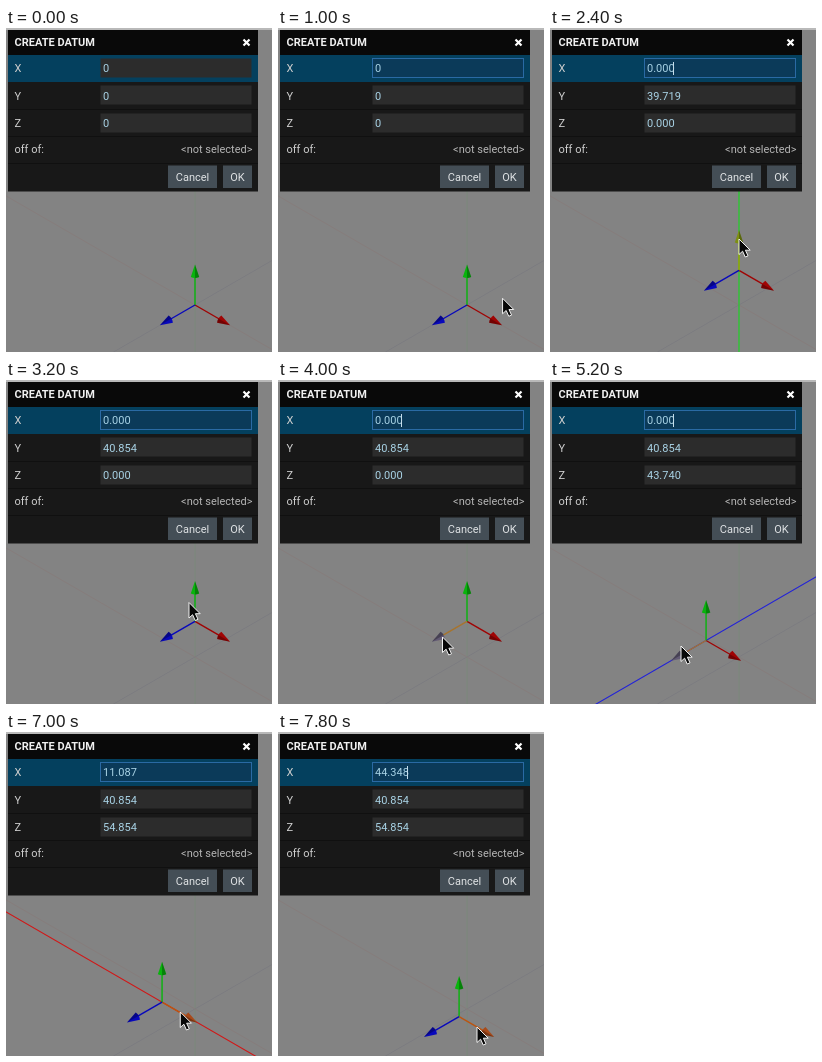
Animation, 266 px wide and 324 px high, one loop 8 s. Source, as an HTML page:

```html
<!DOCTYPE html>
<html lang="en">
<head>
<meta charset="utf-8">
<style>
  html, body { margin: 0; width: 100%; height: 100%; overflow: hidden; background: #838383; }
  svg { display: block; width: 266px; height: 324px; }
  text { font: 11px Roboto, sans-serif; fill: #cfcfcf; white-space: pre; }
  .title { font-weight: 700; fill: #f0f0f0; }
  .value { fill: #a9d3e6; }
  .right { text-anchor: end; fill: #b5b5b5; }
  .button { text-anchor: middle; fill: #e0e3e5; }
</style>
</head>
<body>
<svg viewBox="0 0 266 324">
  <rect width="266" height="324" fill="#838383"/>
  <g fill="none" stroke-width="1">
    <path d="M189 0V324" stroke="#7b887a"/>
    <path d="M0 386.1L266 232.5" stroke="#7c7c80"/>
    <path d="M0 167.9L266 321.5" stroke="#867d7c"/>
  </g>
  <path id="guide" fill="none" stroke-width="1.1"/>
  <g id="gizmo"></g>
  <rect width="266" height="2" fill="#b9b9b9"/>
  <g id="dialog">
    <rect x="2" y="2" width="250" height="161.5" fill="#181818"/>
    <rect x="2" y="2" width="250" height="25" fill="#090909"/>
    <rect x="2" y="27" width="250" height="27" fill="#04405e"/>
    <path d="M2 81.5H252M2 108.5H252M2 135.5H252" stroke="#101010"/>
    <text class="title" x="8.5" y="17.7">CREATE DATUM</text>
    <path d="M237.5 11.5l6 6m0-6l-6 6" stroke="#fff" stroke-width="2.2"/>
    <text x="8.5" y="125">off of:</text>
    <text class="right" x="246.5" y="125">&lt;not selected&gt;</text>
    <rect x="162" y="137.5" width="49" height="22.5" fill="#444e56"/>
    <rect x="217" y="137.5" width="29" height="22.5" fill="#444e56"/>
    <text class="button" x="186.5" y="152.8">Cancel</text>
    <text class="button" x="231.5" y="152.8">OK</text>
  </g>
  <path id="caret" stroke="#c4dcea"/>
  <path id="cursor" d="M0 0V15.5L3.6 12.2L6.2 18L9 16.8L6.4 11.2H11.2Z" fill="#080808" stroke="#f2f2f2" stroke-width="1"/>
</svg>
<script>
const LOOP = 8000, STEP = 200, BASE = [189, 277];
const $ = id => document.getElementById(id);

function add(parent, tag, attrs) {
  const el = document.createElementNS('http://www.w3.org/2000/svg', tag);
  for (const key in attrs) el.setAttribute(key, attrs[key]);
  return parent.appendChild(el);
}

// Per axis: screen direction, colours, value keys [ms, value], hover and drag spans.
const axes = [
  { name: 'X', dir: [.865, .5], color: '#a00404', hot: '#bc5510', hotCone: '#a84a1a', line: '#d01818',
    keys: [[6800, 0], [7600, 44.348]], hover: [6600, 8000] },
  { name: 'Y', dir: [0, -1], color: '#08b40c', hot: '#a3a008', hotCone: '#7d8f12', line: '#18d820',
    keys: [[1800, 0], [2400, 39.719], [2600, 40.854]], hover: [1400, 2900] },
  { name: 'Z', dir: [-.865, .5], color: '#0808bc', hot: '#a8742c', hotCone: '#625a74', line: '#2222d8',
    keys: [[4200, 0], [5200, 43.74], [5500, 54.854]], hover: [3800, 5600] }
];
const SCALE = .87;

const cursorKeys = [
  [600, [268, 300]], [1300, [192, 248]], [1600, [191, 246]], [1800, [191, 246]],
  [2400, [189, 211]], [2600, [189, 210]], [3000, [189, 211]], [3800, [165, 257]],
  [4200, [164, 257]], [5200, [131, 266]], [5500, [122, 271]], [6000, [191.5, 303]],
  [6600, [166, 275]], [6800, [166, 275]], [7600, [199, 295]], [8000, [199, 295]]
];

axes.forEach((axis, i) => {
  const top = 30 + 27.5 * i;
  add($('dialog'), 'text', { x: 8.5, y: top + 14, }).textContent = axis.name;
  axis.box = add($('dialog'), 'rect', { x: 94.5, y: Math.floor(top) + .5, width: 151, height: 19, fill: '#2c2c2c' });
  axis.text = add($('dialog'), 'text', { x: 97, y: top + 14, class: 'value' });
  const angle = Math.atan2(axis.dir[1], axis.dir[0]) * 180 / Math.PI;
  const arrow = add($('gizmo'), 'g', { transform: `rotate(${angle})` });
  axis.shaft = add(arrow, 'path', { d: 'M0 0H29', 'stroke-width': 1.4 });
  axis.cone = add(arrow, 'path', { d: 'M40.5 0L28 -4.2Q26 0 28 4.2Z' });
  add(arrow, 'path', { d: 'M40.5 0H27Q27 2 28 4.2Z', opacity: .28 });
});

function sample(keys, t, mix) {
  if (t <= keys[0][0]) return keys[0][1];
  for (let i = 1; i < keys.length; i++) {
    const [t0, a] = keys[i - 1], [t1, b] = keys[i];
    if (t < t1) return mix(a, b, (t - t0) / (t1 - t0));
  }
  return keys[keys.length - 1][1];
}
const lerp = (a, b, k) => a + (b - a) * k;
const lerpPoint = (a, b, k) => a.map((v, i) => lerp(v, b[i], k));

function draw(t) {
  const touched = t > 1800, focused = t >= 200;
  const origin = [...BASE];
  let active = null;
  for (const axis of axes) {
    const value = sample(axis.keys, t, lerp);
    origin[0] += axis.dir[0] * SCALE * value;
    origin[1] += axis.dir[1] * SCALE * value;
    axis.text.textContent = touched ? value.toFixed(3) : '0';
    const hot = t >= axis.hover[0] && t < axis.hover[1];
    axis.shaft.setAttribute('stroke', hot ? axis.hot : axis.color);
    axis.cone.setAttribute('fill', hot ? axis.hotCone : axis.color);
    if (t >= axis.keys[0][0] && t < axis.keys[axis.keys.length - 1][0]) active = axis;
  }
  $('gizmo').setAttribute('transform', `translate(${origin})`);

  const guide = $('guide');
  guide.style.display = active ? '' : 'none';
  if (active) {
    const end = side => origin.map((v, i) => v + side * 400 * active.dir[i]);
    guide.setAttribute('d', `M${end(-1)}L${end(1)}`);
    guide.setAttribute('stroke', active.line);
  }

  const field = axes[0];
  field.box.setAttribute('fill', focused ? '#0b3a59' : '#2c2c2c');
  field.box.setAttribute('stroke', focused ? '#2a6aa4' : 'none');
  const caretX = Math.floor(97 + field.text.getComputedTextLength()) - .5;
  $('caret').setAttribute('d', `M${caretX} 34V47`);
  $('caret').style.display = focused && (t + 200) % 1300 < 650 ? '' : 'none';

  $('cursor').style.display = t < 600 ? 'none' : '';
  $('cursor').setAttribute('transform', `translate(${sample(cursorKeys, t, lerpPoint)})`);
}

const start = performance.now();
function tick() {
  const t = (performance.now() - start) % LOOP;
  draw(Math.floor(t / STEP) * STEP);
  requestAnimationFrame(tick);
}
tick();
</script>
</body>
</html>
```
